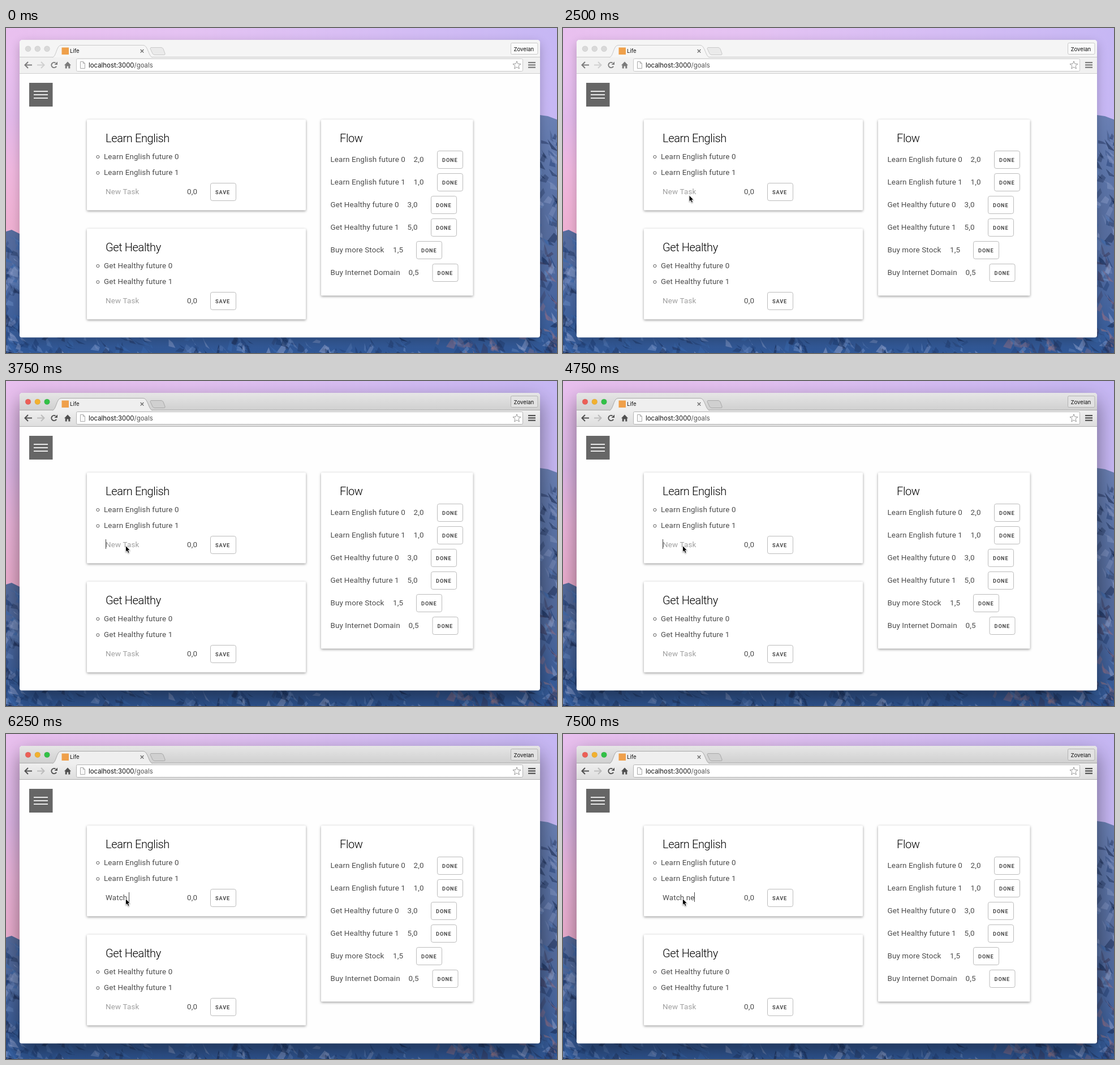
An HTML page with a canvas for the animation above (8 s loop, 974x575 px).

```html
<!DOCTYPE html>
<html lang="en">
<head>
<meta charset="utf-8">
<title>Goals</title>
<style>
html, body { margin: 0; width: 100%; height: 100%; overflow: hidden; }
canvas { display: block; width: 974px; height: 575px; }
</style>
</head>
<body>
<canvas id="stage" width="974" height="575"></canvas>
<script>
const W = 974, H = 575, LOOP = 8000;
const canvas = document.getElementById('stage');
const ctx = canvas.getContext('2d');
const BODY = '400 13.4px Roboto, sans-serif';
const HEAD = '300 20.1px Roboto, sans-serif';
const BUTTON = '700 9.2px Roboto, sans-serif';
const ui = size => `400 ${size}px Inter, sans-serif`;

// [start ms, x, y]
const POINTER = [
  [1000, 589, -9], [1250, 466, 33], [1500, 281, 240], [1750, 286, 279],
  [2000, 247, 289], [2250, 225, 296], [2500, 222.5, 295.5],
  [3250, 222.5, 294.8], [3500, 211, 291]
];
// [start ms, typed text]
const TYPED = [
  [5000, 'W'], [5500, 'Wa'], [5750, 'Wat'], [6000, 'Watch'], [6250, 'Watch '],
  [6750, 'Watch n'], [7000, 'Watch ne'], [7250, 'Watch ne '], [7500, 'Watch ne']
];
const FLOW = [
  ['Learn English future 0', '2,0', 720.5, 762],
  ['Learn English future 1', '1,0', 720.5, 762],
  ['Get Healthy future 0', '3,0', 709.5, 751],
  ['Get Healthy future 1', '5,0', 709.5, 751],
  ['Buy more Stock', '1,5', 684, 725],
  ['Buy Internet Domain', '0,5', 711.5, 753.5]
];

const latest = (steps, t) => steps.filter(s => s[0] <= t).pop();

function gradient(c, x0, y0, x1, y1, colors) {
  const g = c.createLinearGradient(x0, y0, x1, y1);
  colors.forEach((color, i) => g.addColorStop(i / (colors.length - 1), color));
  return g;
}

function text(str, x, y, font, color, spacing = 0) {
  ctx.font = font;
  ctx.letterSpacing = spacing + 'px';
  ctx.fillStyle = color;
  ctx.fillText(str, x, y);
  return ctx.measureText(str).width;
}

const body = (str, x, y, color = '#4c4c4c') => text(str, x, y, BODY, color, 0.134);
const heading = (str, x, y) => text(str, x, y, HEAD, '#000', -0.42);

function box(x, y, w, h, r, fill, stroke) {
  ctx.beginPath();
  ctx.roundRect(x, y, w, h, r);
  if (fill) { ctx.fillStyle = fill; ctx.fill(); }
  if (stroke) { ctx.strokeStyle = stroke; ctx.lineWidth = 1; ctx.stroke(); }
}

function path(points, { c = ctx, fill, stroke, width = 1, close = true }) {
  c.beginPath();
  points.forEach(([x, y]) => c.lineTo(x, y));
  if (close) c.closePath();
  if (fill) { c.fillStyle = fill; c.fill(); }
  if (stroke) { c.strokeStyle = stroke; c.lineWidth = width; c.stroke(); }
}

function shadow(alpha, blur, y) {
  ctx.shadowColor = `rgba(0,0,0,${alpha})`;
  ctx.shadowBlur = blur;
  ctx.shadowOffsetY = y;
}

function makeWallpaper() {
  const photo = document.createElement('canvas');
  photo.width = W;
  photo.height = H;
  const c = photo.getContext('2d');
  let seed = 41;
  const rnd = () => (seed = (seed * 16807) % 2147483647) / 2147483647;

  c.fillStyle = gradient(c, 0, 0, W, 0, ['#e9c0ef', '#e4c2f2', '#d6bdf4', '#c6b7f4']);
  c.fillRect(0, 0, W, H);
  c.fillStyle = gradient(c, 0, 60, 0, 350,
    ['rgba(226,186,236,0)', '#e2b9ea', '#efb7de', '#eeb0d2']);
  c.fillRect(0, 60, 60, 310);

  path([[0, 360], [10, 357], [24, 364], [60, 380], [480, 500], [900, 170], [944, 154],
    [958, 156], [W, 162], [W, H], [0, H]],
    { c, fill: gradient(c, 0, 150, 0, H, ['#6b80b4', '#5b74a8', '#566c9d', '#4a679f', '#2f5796']) });

  // rock facets
  const tones = ['#14264d', '#1d3a70', '#6b8cc4', '#8a9cc8', '#22355f', '#3a68ac'];
  const warm = ['#8e7089', '#3a3350', '#a37a85'];
  for (let i = 0; i < 420; i++) {
    const edge = rnd();
    let x, y;
    if (edge < 0.22) { x = rnd() * 30 - 6; y = 366 + rnd() * 205; }
    else if (edge < 0.48) { x = 940 + rnd() * 34; y = 172 + rnd() * 400; }
    else { x = rnd() * W; y = 542 + rnd() * 33; }
    const set = x > 760 && y > 380 && rnd() < 0.4 ? warm : tones;
    const w = 3 + rnd() * 12, h = 6 + rnd() * 18, lean = (rnd() - 0.5) * 24;
    c.globalAlpha = 0.25 + rnd() * 0.35;
    path([[x, y], [x + w * 0.6, y + h * 0.4], [x + lean + w, y + h], [x + lean, y + h * 0.8]],
      { c, fill: set[Math.floor(rnd() * set.length)] });
  }
  c.globalAlpha = 1;
  return photo;
}

const wallpaper = makeWallpaper();

function drawToolbar(active) {
  const icon = active ? '#505050' : '#7c7c7c';
  const faint = active ? '#bcbcbc' : '#d0d0d0';
  const line = { stroke: icon, width: 2, close: false };

  // back, forward
  path([[46, 65.5], [34, 65.5]], line);
  path([[39, 60], [33.5, 65.5], [39, 71]], line);
  path([[55, 65.5], [67, 65.5]], { ...line, stroke: faint });
  path([[62, 60], [67.5, 65.5], [62, 71]], { ...line, stroke: faint });

  // reload
  ctx.beginPath();
  ctx.arc(85, 65.5, 4.6, 0.5, 5.3);
  ctx.strokeStyle = icon;
  ctx.lineWidth = 2;
  ctx.stroke();
  path([[91, 59.5], [91, 65], [85.5, 65]], { fill: icon });

  // home
  path([[103, 66], [109, 59.5], [115, 66], [113.3, 66], [113.3, 71.5], [110.3, 71.5],
    [110.3, 67.5], [107.7, 67.5], [107.7, 71.5], [104.7, 71.5], [104.7, 66]], { fill: icon });

  // address field
  box(124.5, 54.5, 789, 22, 2, '#fff', active ? '#b4b4b4' : '#c8c8c8');
  path([[131.5, 59.5], [136.5, 59.5], [139.5, 62.5], [139.5, 71.5], [131.5, 71.5]],
    { fill: '#fafafa', stroke: '#aaa' });
  path([[136.5, 59.5], [136.5, 62.5], [139.5, 62.5]], { stroke: '#aaa', close: false });
  const w = text('localhost:3000', 146, 70, ui(11.4), '#111');
  text('/goals', 146 + w, 70, ui(11.4), '#555');

  const star = [];
  for (let i = 0; i < 10; i++) {
    const a = i * Math.PI / 5 - Math.PI / 2, r = i % 2 ? 3.2 : 7.4;
    star.push([903 + r * Math.cos(a), 66 + r * Math.sin(a)]);
  }
  path(star, { fill: '#fff', stroke: '#999' });

  ctx.fillStyle = icon;
  for (const y of [60, 64.3, 68.6]) ctx.fillRect(923, y, 13, 2.2);
}

function drawChrome(active) {
  shadow(active ? 0.46 : 0.22, active ? 36 : 18, active ? 14 : 6);
  box(24, 21, 920, 526.5, [5, 5, 4, 4], '#fefefe');
  shadow(0, 0, 0);

  box(24, 21, 920, 31, [5, 5, 0, 0],
    active ? gradient(ctx, 0, 21, 0, 51, ['#e6e6e6', '#d0d0d0']) : '#f5f5f5');
  const edge = active ? '#a9a9a9' : '#c9c9c9';
  ctx.fillStyle = edge;
  ctx.fillRect(24, 51, 920, 1);
  ctx.fillStyle = active ? gradient(ctx, 0, 52, 0, 80, ['#efefef', '#dedede']) : '#f1f1f1';
  ctx.fillRect(24, 52, 920, 28);
  ctx.fillStyle = active ? '#b2b2b2' : '#cfcfcf';
  ctx.fillRect(24, 80, 920, 1);

  const lights = active ? ['#ec5f57', '#f2b12f', '#32c146'] : ['#d9d9d9', '#d9d9d9', '#d9d9d9'];
  lights.forEach((color, i) => {
    ctx.beginPath();
    ctx.arc(39 + i * 16.75, 36.8, 4.9, 0, 7);
    ctx.fillStyle = color;
    ctx.fill();
    ctx.strokeStyle = 'rgba(0,0,0,.1)';
    ctx.lineWidth = 0.8;
    ctx.stroke();
  });

  // tab
  ctx.beginPath();
  ctx.moveTo(82, 52);
  ctx.bezierCurveTo(89, 51, 89, 31, 97, 30.5);
  ctx.lineTo(243, 30.5);
  ctx.bezierCurveTo(251, 31, 252, 51, 259, 52);
  ctx.fillStyle = active ? '#efefef' : '#f6f6f6';
  ctx.fill();
  ctx.strokeStyle = edge;
  ctx.lineWidth = 1;
  ctx.stroke();

  // new tab
  ctx.beginPath();
  ctx.moveTo(256, 34.5);
  ctx.lineTo(274, 34.5);
  ctx.quadraticCurveTo(277, 34.5, 278, 37);
  ctx.lineTo(281, 45);
  ctx.quadraticCurveTo(282, 47.5, 279, 47.5);
  ctx.lineTo(263, 47.5);
  ctx.quadraticCurveTo(260, 47.5, 259, 45);
  ctx.lineTo(255, 36.5);
  ctx.closePath();
  ctx.fillStyle = active ? '#d0d0d0' : '#eaeaea';
  ctx.fill();
  ctx.strokeStyle = edge;
  ctx.stroke();

  box(98.5, 34.5, 12.5, 12.5, 0, '#efa04b');
  text('Life', 113, 44.4, ui(9.6), '#111');
  const cross = { stroke: '#666', width: 1.3, close: false };
  path([[237.7, 38], [243.3, 43.6]], cross);
  path([[243.3, 38], [237.7, 43.6]], cross);

  box(892.5, 26.5, 47.5, 20, 2, active ? '#e2e2e2' : '#fafafa', active ? '#b3b3b3' : '#c9c9c9');
  text('Zovelan', 897.5, 41, ui(9.6), '#111');
  drawToolbar(active);
}

function card(x, y, w, h) {
  shadow(0.4, 4.5, 1.5);
  box(x, y, w, h, 1.5, '#fff');
  shadow(0, 0, 0);
}

function button(label, x, y) {
  box(x + 0.5, y + 0.5, 45, 31, 3.3, '#fff', '#bbb');
  text(label, x + 9.1, y + 20, BUTTON, '#4c4c4c', 0.84);
}

function goalCard(title, y, typed) {
  card(143, y, 387, 160.5);
  heading(title, 176, y + 39.7);
  for (const i of [0, 1]) {
    const mid = y + 66 + i * 28.4;
    ctx.beginPath();
    ctx.arc(162.4, mid, 2.5, 0, 7);
    ctx.strokeStyle = '#555';
    ctx.lineWidth = 1;
    ctx.stroke();
    body(`${title} future ${i}`, 173, mid + 4);
  }
  const base = y + 131.7;
  let w = 0;
  if (typed) w = body(typed, 176, base);
  else body('New Task', 176, base, '#a0a0a0');
  body('0,0', 320, base);
  button('SAVE', 361, y + 112);
  return Math.floor(176 + w);
}

function drawPage(t) {
  ctx.fillStyle = '#666';
  ctx.fillRect(41, 97, 41.5, 42);
  ctx.fillStyle = '#fff';
  for (const y of [111.2, 117.2, 123.2]) ctx.fillRect(49, y, 25, 1.7);

  const typed = latest(TYPED, t);
  const caretX = goalCard('Learn English', 162, typed && typed[1]);
  if (t >= 4750 || (t >= 3750 && t < 4250)) {
    ctx.fillStyle = '#444';
    ctx.fillRect(caretX, 280, 1, 17);
  }
  goalCard('Get Healthy', 355, '');

  card(557, 162, 268.5, 311.5);
  heading('Flow', 590, 201.7);
  FLOW.forEach(([name, hours, hoursX, buttonX], i) => {
    const y = 237.2 + i * 40;
    body(name, 573.4, y);
    body(hours, hoursX, y);
    button('DONE', buttonX, y - 20.2);
  });

  // suggestion panel
  if (t >= 5000 && t < 5500) box(176.5, 305.5, 140, 53, 0, '#fff', '#c4c4c4');
}

function drawPointer(t) {
  const step = latest(POINTER, t);
  if (!step) return;
  ctx.save();
  ctx.translate(step[1], step[2]);
  shadow(0.3, 2, 1);
  path([[0.5, 0.3], [0.5, 11.8], [3, 9.5], [4.9, 13.6], [7, 12.7], [5.2, 8.6], [8.6, 8.6]],
    { fill: '#000', stroke: '#fff', width: 0.9 });
  ctx.restore();
}

function frame(now) {
  const t = now % LOOP;
  ctx.drawImage(wallpaper, 0, 0);
  drawChrome(t >= 3000);
  drawPage(t);
  drawPointer(t);
  requestAnimationFrame(frame);
}
requestAnimationFrame(frame);
</script>
</body>
</html>
```
